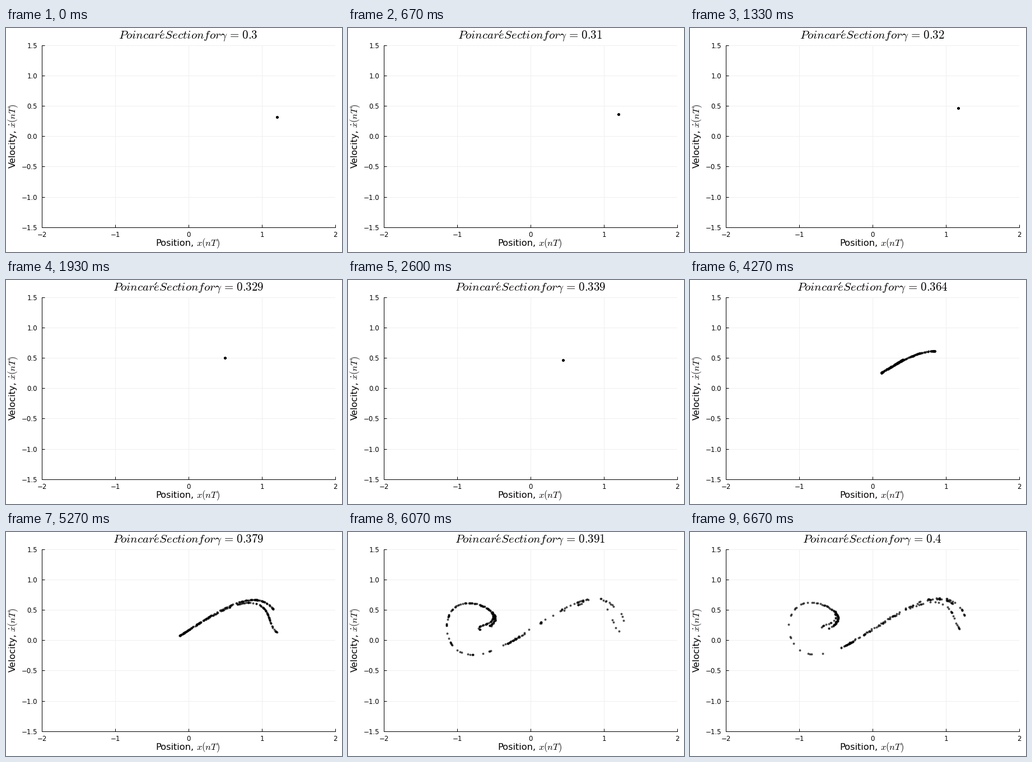
These frames come from a looping animation (600 px wide and 400 px high, 6.74 s). A matplotlib script:

```python
import numpy as np
import matplotlib.pyplot as plt
from matplotlib.animation import FuncAnimation

W, H, DPI = 600, 400, 100
LOOP, TICK = 6740, 20  # ms
VALUES, RATE = 101, 15  # gamma steps, steps per second
PX = 72 / DPI  # points per pixel
DAMPING = 0.5
SETTLE, POINTS, STEPS = 100, 240, 64

plt.rcParams.update({
    "font.family": "DejaVu Sans",
    "mathtext.fontset": "cm",
    "axes.unicode_minus": True,
})

gammas = np.round(0.3 + 0.001 * np.arange(VALUES), 3)


def poincare(gamma):
    """Strobe x'' + d x' - x + x^3 = gamma cos t once per drive period."""
    # Below the fold the small orbit is followed, above it the large one.
    small = gamma < 0.322
    x = np.where(small, 1.2, 0.5)
    v = np.where(small, 0.34, 0.48)
    dt = 2 * np.pi / STEPS
    drive = np.cos(np.arange(2 * STEPS + 1) * dt / 2)

    def accel(x, v, c):
        return gamma * c - DAMPING * v + x - x * x * x

    section = np.empty((POINTS, 2, len(gamma)))
    for n in range(SETTLE + POINTS):
        for k in range(STEPS):
            c0, c1, c2 = drive[2 * k:2 * k + 3]
            a1 = accel(x, v, c0)
            v2 = v + a1 * dt / 2
            a2 = accel(x + v * dt / 2, v2, c1)
            v3 = v + a2 * dt / 2
            a3 = accel(x + v2 * dt / 2, v3, c1)
            v4 = v + a3 * dt
            a4 = accel(x + v3 * dt, v4, c2)
            x = x + dt / 6 * (v + 2 * v2 + 2 * v3 + v4)
            v = v + dt / 6 * (a1 + 2 * a2 + 2 * a3 + a4)
        if n >= SETTLE:
            section[n - SETTLE] = x, v
    return section


section = poincare(gammas)

fig = plt.figure(figsize=(W / DPI, H / DPI), dpi=DPI, facecolor="white")
ax = fig.add_axes([64 / W, 1 - 355.75 / H, 524 / W, 325 / H])
ax.set(xlim=(-2, 2), ylim=(-1.5, 1.5))
ax.set_xticks(np.arange(-2, 3))
ax.set_yticks(np.arange(-3, 4) / 2)
ax.set_axisbelow(True)
ax.grid(color="#efefef", linewidth=PX)
ax.tick_params(direction="in", length=5 * PX, width=PX, labelsize=8.5)
ax.tick_params(axis="x", pad=5.4)
ax.tick_params(axis="y", pad=5.6)
for side in ("top", "right"):
    ax.spines[side].set_visible(False)
for side in ("left", "bottom"):
    ax.spines[side].set_linewidth(PX)


def label(x, y, text, size, **style):
    """Place text by its baseline, in pixels from the top left."""
    return fig.text(x / W, 1 - y / H, text, fontsize=size,
                    va="baseline", **style)


upright = dict(rotation=90, rotation_mode="anchor")
label(267, 389, "Position,", 11.7)
label(340, 389, "$x(nT)$", 11.9)
label(17, 250.5, "Velocity,", 11.7, **upright)
label(17, 177.5, r"$\dot{x}(nT)$", 11.9, **upright)

title = label(325.5, 19, "", 15.1, ha="center")
accent = plt.Line2D([], [], color="black", linewidth=1.2 * PX,
                    transform=fig.transFigure)
fig.add_artist(accent)

dots = ax.scatter([], [], s=(3.9 * PX) ** 2, color="black", alpha=0.7,
                  linewidths=0, zorder=3)


def draw(tick):
    # Look ahead under one tick so that steps fall on rounded times.
    i = min(int((tick * TICK + 15) * RATE / 1000), VALUES - 1)
    value = f"{gammas[i]:g}"
    title.set_text(r"$PoincareSectionfor\gamma\hspace{0.12}=\hspace{0.12}"
                   + value + "$")
    left = 276.5 - 5.2 * (len(value) - 3)
    accent.set_data([left / W, (left + 3) / W], [1 - 8.5 / H, 1 - 4.5 / H])
    dots.set_offsets(section[:, :, i])
    return title, accent, dots


anim = FuncAnimation(fig, draw, frames=LOOP // TICK, interval=TICK,
                     repeat=True, repeat_delay=0, blit=False)
plt.show()
```
